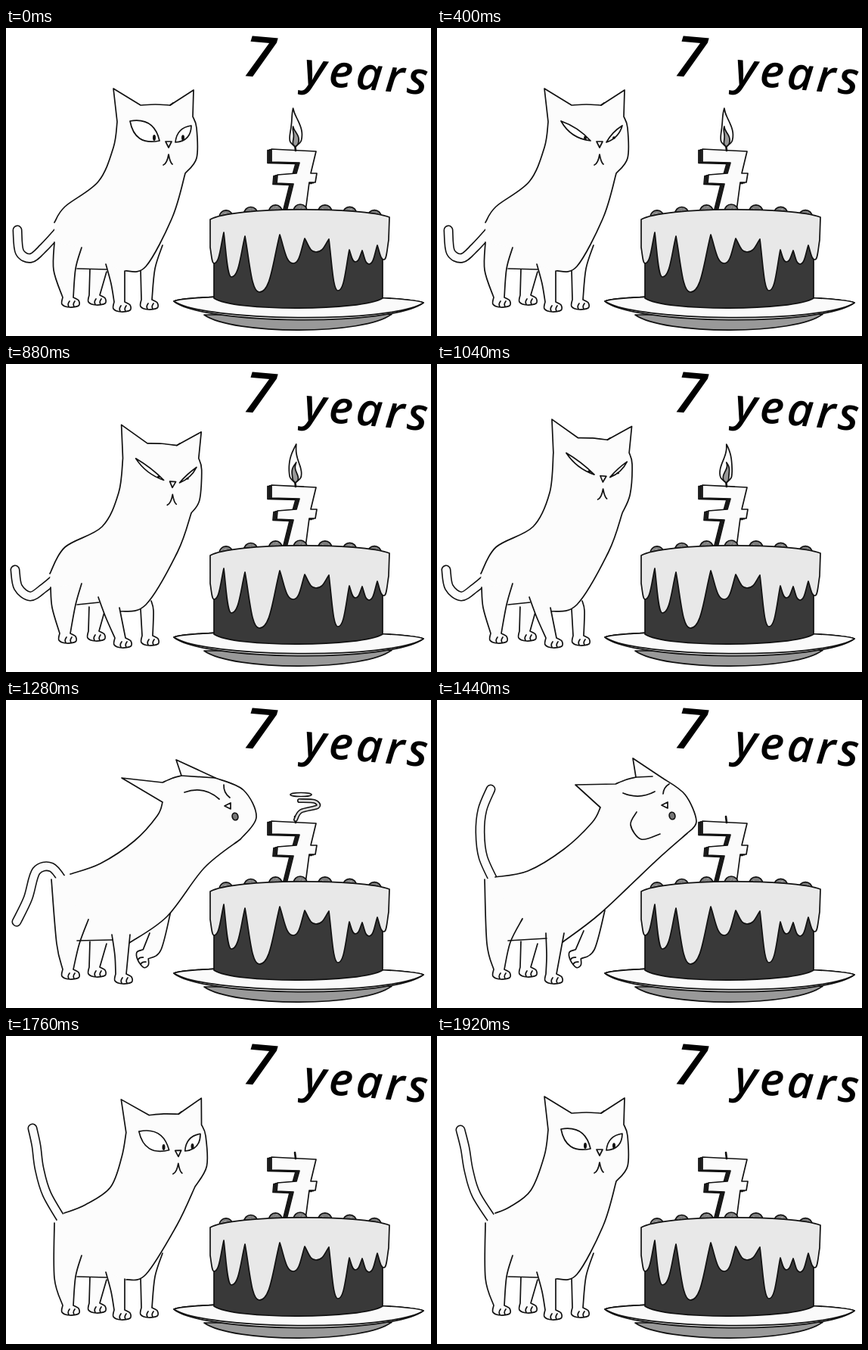
An HTML page for the animation above (2410 ms loop, 562 by 407 pixels).

```html
<!DOCTYPE html>
<html lang="en">
<head>
<meta charset="utf-8">
<title>Birthday cat</title>
<style>
  html, body { margin: 0; width: 100%; height: 100%; overflow: hidden; background: #fff; }
  svg { display: block; width: 562px; height: 407px; stroke-linejoin: round; stroke-linecap: round; }
  text { font: italic 600 60px "Comic Sans MS", "Open Sans", "Noto Sans", sans-serif; }
  g { stroke: #111; stroke-width: 1.7; fill: none; }
</style>
</head>
<body>
<svg id="stage" viewBox="0 0 562 407">
  <text transform="translate(312 63) rotate(5)" style="font-size:75px">7</text>
  <text transform="translate(392 74) rotate(5)" letter-spacing="4.4">years</text>
  <g id="cake"></g>
  <g id="fire"></g>
  <g id="cat"></g>
</svg>
<script>
const LOOP = 2410, STEP = 80, FUR = '#fcfcfc';
const cake = document.getElementById('cake');
const fire = document.getElementById('fire');
const cat = document.getElementById('cat');

// ---- drawing helpers ----
function set(el, attrs) {
  for (const k in attrs) el.setAttribute(k, attrs[k]);
  return el;
}
function add(parent, tag, attrs) {
  const el = document.createElementNS('http://www.w3.org/2000/svg', tag);
  parent.append(el);
  return set(el, attrs);
}
const path = (parent, fill = 'none', d = '', more = {}) => add(parent, 'path', { d, fill, ...more });
const show = (el, on) => set(el, { visibility: on ? 'visible' : 'hidden' });
const points = text => text.split(' ').map(p => p.split(',').map(Number));

// Smooth curve through points; continues an open path when join is set
function smooth(pts, join) {
  let d = join ? '' : 'M' + pts[0];
  for (let i = 0; i < pts.length - 1; i++) {
    const b = pts[i], c = pts[i + 1], a = pts[i - 1] || b, e = pts[i + 2] || c;
    const lead = b.map((v, k) => v + (c[k] - a[k]) / 6);
    const trail = c.map((v, k) => v - (e[k] - b[k]) / 6);
    d += `C${lead} ${trail} ${c}`;
  }
  return d;
}
const line = pts => 'L' + pts.join('L');

// An outlined band of even width along one curve
function ribbon(parent, width, fill) {
  const edge = path(parent, 'none', '', { 'stroke-width': width });
  const core = path(parent, 'none', '', { 'stroke-width': width - 3.2, stroke: fill });
  return d => [edge, core].forEach(el => set(el, { d }));
}

function turned([x, y], deg) {
  const a = deg * Math.PI / 180, c = Math.cos(a), s = Math.sin(a);
  return [x * c - y * s, x * s + y * c];
}
const plus = (a, b) => [a[0] + b[0], a[1] + b[1]];

// Blends numbers, arrays and objects of the same form
function mix(a, b, f) {
  if (typeof a === 'number') return a + (b - a) * f;
  if (Array.isArray(a)) return a.map((v, i) => mix(v, b[i], f));
  return Object.fromEntries(Object.keys(a).map(k => [k, mix(a[k], b[k], f)]));
}

// ---- heads: outline runs from the left ear over the crown to the cheek ----
// eyes: corners of both; lids: bulge of upper and lower lid for each eye
const head = (outline, eyes, lids, pupils, nose, turn, brow) => ({
  outline: points(outline), eyes: points(eyes), lids,
  pupils: points(pupils), nose: points(nose), turn, brow: points(brow)
});
const WIDE = [11, -12, 6, -7], SQUINT = [3, -6, 2, -4], SLIT = [1.5, -4, 1, -3];

const upright = head('147,124 142,80 178,102 217,102 248,82 247,117 252,132 252,172',
  '164,123 203,149 224,151 245,129', WIDE, '196,145 234,145', '215,154', 0, '221,99');
const puffing = head('207,135 153,103 207,109 232,100 225,79 277,103 314,119 331,155',
  '236,122 282,131 288,112 296,129', [7, 7, -2.5, -2.5], '275,127 291,120', '293,140', 90, '277,103');
const pleased = head('216,142 183,112 236,111 263,102 259,77 298,103 328,125 343,160',
  '246,123 288,121 299,124 307,111', [-5, -5, 2, 2], '280,124 301,117', '301,139', 90, '285,101');

function held(dx, dy, tilt, lids) {
  const pivot = [195, 130];
  const move = p => plus(turned(plus(p, [-195, -130]), tilt), plus(pivot, [dx, dy]));
  const moved = { ...upright, lids, turn: tilt };
  for (const k of ['outline', 'eyes', 'pupils', 'nose', 'brow']) moved[k] = upright[k].map(move);
  return moved;
}

// ---- poses ----
const leg = (down, paw, up) => ({ down: points(down), paw: points(paw)[0], up: points(up) });
const pose = (head, back, chest, tail, ...legs) =>
  ({ head, back: points(back), chest: points(chest), tail: points(tail), legs });

// legs in order: far hind, far front, hind, front
const farHind = leg('111,318', '120,366,0', '133,322');
const farFront = leg('178,319', '189,372,0', '197,318 207,287');
const front = leg('132,312 139,338', '153,375,0', '157,321');
const hind = (top, knee) => leg(`${top} ${knee}`, '85,369,0', '92,318 100,290');

const stand = pose(upright, '64,257 78,236 122,203 142,158', '237,192 220,250 185,315 158,321',
  '72,266 50,290 33,304 18,296 15,267', farHind, farFront, hind('64,283', '63,320'), front);
const squint = { ...stand, head: held(0, 0, 0, SQUINT) };
const crouch = pose(held(7, 4, 4, SLIT), '58,277 78,242 127,215 149,170', '245,197 227,248 185,318 151,327',
  '68,281 50,296 32,307 16,295 12,272',
  leg('110,318', '119,366,0', '130,328'), leg('178,324', '190,372,0', '195,326 192,313'),
  leg('59,295 61,322', '81,369,0', '92,318 100,290'), leg('122,308 132,335', '154,375,0', '150,322'));
const inhale = { ...crouch, head: held(6, -7, 4, SLIT) };
const blow = pose(puffing, '85,230 125,216 170,186 200,153', '310,184 262,222 213,286 163,321',
  '76,240 60,221 40,226 29,262 14,293',
  farHind, leg('190,308', '175,345,60', '205,330 219,274'),
  leg('60,237 67,322', '85,369,0', '97,322 109,290'), leg('140,310 144,338', '155,375,0', '164,310'));
const done = pose(pleased, '77,234 120,226 168,197 205,162', '331,176 290,212 216,282 166,320',
  '78,245 61,208 57,175 60,145 71,118',
  farHind, leg('194,305', '177,345,60', '208,330 222,278'),
  leg('63,237 66,322', '85,369,0', '97,320 113,289'), leg('144,308 145,338', '154,375,0', '168,308'));
const turnBack = pose(held(12, 2, -2, WIDE), '77,234 105,223 138,200 153,160', '250,199 226,250 185,315 159,322',
  '78,250 54,209 44,175 40,145 35,122', farHind, farFront, hind('64,247', '64,320'), front);
const proud = pose(upright, '77,234 96,226 124,204 142,158', '237,192 220,250 185,315 158,321',
  '78,250 52,210 42,178 37,148 31,124', farHind, farFront, hind('64,247', '64,320'), front);

const timeline = [[0, stand], [80, stand], [400, squint], [560, squint], [880, crouch], [1120, inhale],
  [1280, blow], [1440, done], [1520, done], [1760, turnBack], [1920, proud]];

function poseAt(t) {
  const i = timeline.findIndex(k => k[0] > t);
  if (i < 0) return proud;
  const [t0, a] = timeline[i - 1], [t1, b] = timeline[i];
  return mix(a, b, (t - t0) / (t1 - t0));
}

// ---- cat parts ----
const drawTail = ribbon(cat, 13, FUR);
const farLegs = [path(cat, FUR), path(cat, FUR)];
const hull = path(cat, FUR, '', { stroke: 'none' });
const outline = path(cat);
const nearLegs = [path(cat, FUR), path(cat, FUR)];
const legEls = [...farLegs, ...nearLegs];
const extras = path(cat);
const eyeEls = [path(cat, '#fff'), path(cat, '#fff')];
const pupilEls = [0, 1].map(() => add(cat, 'ellipse', { fill: '#111', stroke: 'none' }));
const noseEl = path(cat, '#fff', 'M-4,-4L4,-4L0,4Z');
const mouthEl = path(cat, 'none', 'M-7,27Q-2,25 0,13Q2,24 5,26');
const puffEl = add(cat, 'ellipse', { rx: 3.8, ry: 4.8, fill: '#777' });
const cheekEl = path(cat, 'none', smooth(points('264,148 256,165 270,184 295,177')));

function legPath({ down, paw: [x, y, tilt], up }) {
  const at = p => plus(turned(p, tilt), [x, y]);
  const paw = points('-10,-13 -11,-4 -1,0 11,-2 11,-9 4,-13').map(at);
  const toes = [-2, 5].map(k => `M${at([k, -1])}Q${at([k - 2, -4])} ${at([k + 1, -8])}`);
  return smooth([...down, paw[0]]) + smooth(paw, true) + smooth([paw[5], ...up], true) + toes.join('');
}

function eyePath(a, b, upper, lower) {
  const dx = b[0] - a[0], dy = b[1] - a[1], len = Math.hypot(dx, dy);
  const mid = mix(a, b, .5);
  const lid = h => plus(mid, [2 * h * dy / len, -2 * h * dx / len]);
  return `M${a}Q${lid(upper)} ${b}Q${lid(lower)} ${a}`;
}

function drawCat(p, t) {
  const { head, back, chest, legs } = p, ears = head.outline;
  const body = smooth([...back, ears[0]]) + line(ears.slice(1, 3)) +
    smooth([ears[2], plus(mix(ears[2], ears[3], .5), [0, -1]), ears[3]], true) + line(ears.slice(4, 6)) +
    smooth([...ears.slice(5), chest[0]], true) + smooth(chest, true);
  const [, , hindLeg, frontLeg] = legs;
  set(outline, { d: body });
  set(hull, { d: body + line([[95, 318], hindLeg.down[1], hindLeg.down[0]]) + 'Z' });
  drawTail(smooth(p.tail));
  legs.forEach((l, i) => set(legEls[i], { d: legPath(l) }));
  set(extras, { d: `M94,318L${plus(frontLeg.down[0], [1, 7])}M${ears[3]}L${head.brow[0]}` });

  eyeEls.forEach((el, i) => {
    const [upper, lower] = head.lids.slice(2 * i, 2 * i + 2);
    const [cx, cy] = head.pupils[i];
    set(el, { d: eyePath(head.eyes[2 * i], head.eyes[2 * i + 1], upper, lower) });
    set(pupilEls[i], { cx, cy, rx: 2, ry: Math.min(4, (upper - lower) / 3.5) });
    show(pupilEls[i], upper - lower > 2);
  });

  const blowing = t >= 1200 && t < 1600, nose = head.nose[0];
  set(noseEl, { transform: `translate(${nose}) rotate(${head.turn})` });
  set(mouthEl, { transform: `translate(${nose})` });
  set(puffEl, { transform: `translate(${plus(nose, [10, 14])}) rotate(-15)` });
  show(mouthEl, !blowing);
  show(puffEl, blowing);
  show(cheekEl, t === 1440);
}

// ---- flame and smoke ----
const flame = path(fire, '#fdfdfd'), glow = path(fire, '#999');
const drawSmoke = ribbon(fire, 6, '#ddd');
const puffRing = add(fire, 'ellipse', { cx: 390, cy: 125, rx: 14, ry: 2.5, fill: '#fff' });

function tongue(height, width, n, lean) {
  const left = [], right = [];
  for (let i = 0; i <= 8; i++) {
    const u = i / 8, y = 157 - height * u;
    const x = 382.5 + 3 * u * Math.sin(5 * u + 1.3 * n) + lean * u * u;
    const w = width * Math.sin(Math.PI * u ** .6) * (1 - .35 * u);
    left.push([x - w, y]);
    right.unshift([x + w, y]);
  }
  return smooth(left) + smooth(right, true);
}

function drawFire(t) {
  const lit = t < 1280, lean = t < 1200 ? 0 : 22, drift = (t - 1280) / STEP;
  set(flame, { d: tongue(51, 9, t / STEP, lean) });
  set(glow, { d: tongue(27, 4.2, t / STEP, lean / 4) });
  const plume = points('383,158 390,147 412,141 408,134 388,133').slice(drift > 0 ? 2 : 0);
  drawSmoke(lit ? '' : smooth(plume.map(p => plus(p, [5 * drift, -4 * drift]))));
  set(puffRing, { transform: `translate(${5 * drift} ${-4 * drift})` });
  show(flame, lit);
  show(glow, lit);
  show(puffRing, !lit && t < 1440);
  show(fire, t < 1440);
  if (t >= 1440) drawSmoke('');
}

// ---- cake ----
function random(seed) {
  return () => (seed = seed * 16807 % 2147483647) / 2147483647;
}

function buildCake() {
  const rand = random(7);
  path(cake, '#999', 'M262,379C300,406 476,406 510,378Z');
  for (const sag of [4, 0])
    path(cake, '#fafafa', `M222,361C260,${388 + sag} 510,${391 + sag} 552,363C530,352 250,350 222,361Z`);
  path(cake, '#393939', 'M275,262V357C300,375 472,374 498,357V262Z');

  const seven = 'M351,160L410,163L403,192L411,192L409,204L401,204L396,242L371,242L380,206L358,205L359,194L384,192L388,178L351,177Z';
  for (const k of [1, .5, 0])
    path(cake, k ? '#333' : '#fbfbfb', seven, { transform: `translate(${-5 * k} ${1.5 * k})` });
  path(cake, 'none', 'M382,154L383,162', { 'stroke-width': 2.6 });

  for (let i = 0; i < 7; i++) {
    const cx = 291 + 32.7 * i, cy = 242 + 8 * ((cx - 390) / 100) ** 2;
    add(cake, 'circle', { cx, cy, r: 9, fill: '#7d7d7d' });
    for (let k = 0; k < 14; k++) {
      const [x, y] = turned([7.5 * rand(), 0], -180 * rand());
      add(cake, 'circle', { cx: cx + x, cy: cy + y, r: .6, fill: '#aaa', stroke: 'none' });
    }
  }

  // Icing edge: round drip tips alternating with sharp gaps
  const edge = points('275,311 288,270 298,329 316,275 335,349 362,273 380,311 395,278 410,296 ' +
    '427,279 439,347 454,293 462,309 471,294 480,312 491,287 500,306 506,280');
  let d = 'M507,250C470,236 300,236 270,253V290', from = [270, 290];
  edge.forEach((to, i) => {
    const [gap, tip] = i % 2 ? [to, from] : [from, to];
    const side = [gap[0] + .35 * (tip[0] - gap[0]), gap[1] + .5 * (tip[1] - gap[1])];
    const round = [tip[0] + .55 * (gap[0] - tip[0]), tip[1]];
    d += `C${i % 2 ? round : side} ${i % 2 ? side : round} ${to}`;
    from = to;
  });
  path(cake, '#e8e8e8', d + 'Z');
}

// ---- clock ----
function stepTime(ms) {
  const t = Math.min(1920, Math.floor(ms / STEP) * STEP);
  return t === 1520 ? 1440 : t;
}

buildCake();
const start = performance.now();
let shown = -1;
function tick() {
  const t = stepTime((performance.now() - start) % LOOP);
  if (t !== shown) {
    shown = t;
    drawCat(poseAt(t), t);
    drawFire(t);
  }
  requestAnimationFrame(tick);
}
tick();
</script>
</body>
</html>
```
